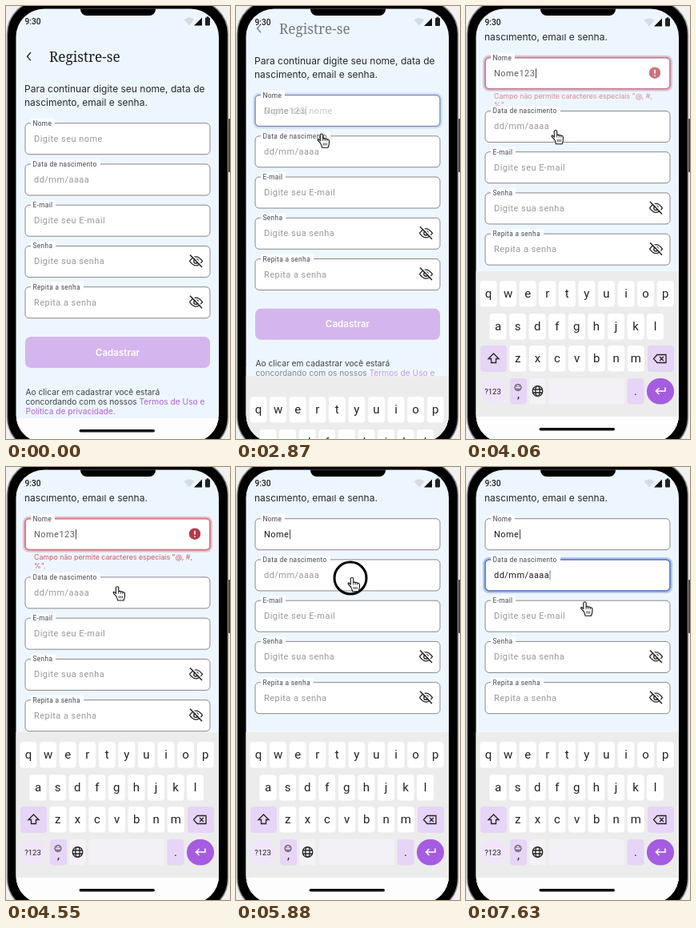
Write an HTML page that moves like this. It is 280 px wide and 542 px high and loops after 8000 ms.

```html
<!DOCTYPE html>
<html lang="pt">
<head>
<meta charset="utf-8">
<title>Registre-se</title>
<style>
  html, body { margin: 0; width: 100%; height: 100%; overflow: hidden; background: #f1f1f1; }
  svg { display: block; width: 280px; height: 542px; font-family: Inter, sans-serif; }
  .para { font-size: 12px; fill: #26282c; }
  .terms { font-size: 10.2px; fill: #3d434a; }
  .link { fill: #b35fdc; }
  .title { font: 500 17.2px "Noto Serif", serif; fill: #1c1c1c; }
  .label { font: 8.3px Roboto, sans-serif; letter-spacing: .35px; fill: #49454f; }
  .value { font: 11px Roboto, sans-serif; letter-spacing: .45px; fill: #1d1b20; }
  .hint { fill: #999; }
  .error { font-size: 8.8px; fill: #cf5968; }
  .key { font: 15px Roboto, sans-serif; fill: #222; text-anchor: middle; }
  .line { fill: none; stroke: #222; stroke-width: 1.3; }
</style>
</head>
<body>
<svg id="stage" viewBox="0 0 280 542"></svg>
<script>
const LOOP = 8000, TICK = 70, SCROLL = 82, GAP = 22;
const stage = document.getElementById('stage');

const clamp = x => Math.max(0, Math.min(1, x));
const smooth = x => x * x * (3 - 2 * x);
const part = (t, from, to) => clamp((t - from) / (to - from));
const easeOut = (t, from) => 1 - (1 - part(t, from, from + 600)) ** 3;

const text = (x, y, cls, str, more = '') => `<text x="${x}" y="${y}" class="${cls}" ${more}>${str}</text>`;
const rect = (x, y, w, h, r, fill, more = '') =>
  `<rect x="${x}" y="${y}" width="${w}" height="${h}" rx="${r}" fill="${fill}" ${more}/>`;
const line = (d, more = '') => `<path class="line" d="${d}" ${more}/>`;
const group = (x, y, body, alpha = 1) => `<g transform="translate(${x} ${y})" opacity="${alpha}">${body}</g>`;

const labels = ['Nome', 'Data de nascimento', 'E-mail', 'Senha', 'Repita a senha'];
const labelWidth = [25, 82, 26, 26, 61];
const hints = ['Digite seu nome', 'dd/mm/aaaa', 'Digite seu E-mail', 'Digite sua senha', 'Repita a senha'];
const errors = [
  ['Campo não permite caracteres especiais "@, #,', '%".'],
  ['O formato da data está incorreto. Por favor, insira', 'no formato DD/MM/AAAA.']
];

const eye = group(237.5, 19,
  line('M-8 0Q0-11 8 0Q0 11-8 0') + '<circle class="line" r="2.7"/>' +
  line('M-6-8.5L8.5 6', 'style="stroke:#fff;stroke-width:1.6"') +
  line('M-7.5-8L7.5 7.5', 'style="stroke-width:1.5"'));

const outline = (color, alpha, width) => alpha > 0 ? `<g opacity="${alpha}">` +
  rect(22.5, -1.5, 234, 42, 6, 'none', `stroke="${color}" stroke-opacity=".4" stroke-width="3"`) +
  rect(24, 0, 231, 39, 5, 'none', `stroke="${color}" stroke-width="${width}"`) + '</g>' : '';

const caret = (x, color, alpha) =>
  `<path d="M${x} 13.5v12" stroke="${color}" stroke-width="1" opacity="${alpha}"/>`;

function field(i, y, { hint = 1, focus = 0, bad = 0, value = '' } = {}) {
  let s = rect(24, 0, 231, 39, 5, '#fff', 'stroke="#8c878a"');
  s += outline('#5a7bd8', focus * (1 - bad), 1.6) + outline('#dc7480', bad, 1.8);
  s += rect(31, -6, labelWidth[i] + 5, 11, 0, '#fafdff') + text(33.5, 3, 'label', labels[i]);
  s += text(35, 23, 'value hint', hints[i], `opacity="${hint}"`) + value;
  if (i > 2) s += eye;
  if (bad > 0) {
    s += `<g opacity="${bad}"><circle cx="236" cy="19" r="7.2" fill="#b33a46"/>` +
      '<path d="M236 15v5m0 1.7v1.6" stroke="#fff" stroke-width="1.5"/>' +
      errors[i].map((e, n) => text(35, 51 + n * 11, 'error', e)).join('') + '</g>';
  }
  return group(0, y, s);
}

function form(t, open) {
  const bad1 = t < 4060 ? 0 : easeOut(t, 3860) - easeOut(t, 5200);
  const bad2 = t < 7630 ? easeOut(t, 6215) : 0;
  const left = 1 - easeOut(t, 5200), date = t >= 7630;
  const name = text(35, 23, 'value',
      `Nome<tspan opacity="${left}">123</tspan>`,
      `opacity="${open}" style="fill:${t < 5200 ? '#5f5f63' : '#1d1b20'}"`) +
    caret(t < 5250 ? 87.5 : 67.5, t < 4000 ? '#5a7bd8' : '#444', open);
  const birth = date
    ? text(35, 23, 'value', 'dd/mm/aaaa') + caret(105, '#5a7bd8', 1)
    : text(35, 23, 'value', '5/8/2025', `opacity="${bad2 * .9}"`) + caret(86.5, '#555', bad2);
  const states = [
    { hint: 1 - open, focus: open * left, bad: bad1, value: name },
    { hint: date ? 0 : 1 - bad2, focus: +date, bad: bad2, value: birth }
  ];
  const shift = i => (i > 0 ? GAP * bad1 : 0) + (i > 1 ? GAP * bad2 : 0);
  let s = text(23, 108, 'para', 'Para continuar digite seu nome, data de') +
    text(23, 125, 'para', 'nascimento, email e senha.');
  labels.forEach((_, i) => s += field(i, 146.7 + i * 51.25 + shift(i), states[i]));
  return s + group(0, shift(4),
    rect(24, 414, 231, 39, 7, '#d5b5ed') +
    text(139.5, 437.5, '', 'Cadastrar', 'font-size="11.6" font-weight="600" fill="#fff" text-anchor="middle"') +
    text(24.5, 486.5, 'terms', 'Ao clicar em cadastrar você estará') +
    text(24.5, 498.5, 'terms', 'concordando com os nossos <tspan class="link">Termos de Uso e</tspan>') +
    text(24.5, 510.5, 'terms link', 'Política de privacidade.'));
}

const lilac = '#e6d5f6';
const letterRow = (str, x, y) => [...str].map((c, i) => {
  const cx = x + i * 24.58;
  return rect(cx - 10.5, y - 16, 21, 32.5, 4, '#fff') + text(cx, y + 5, 'key', c);
}).join('');

const keys =
  letterRow('qwertyuiop', 28, 360) + letterRow('asdfghjkl', 40, 401) + letterRow('zxcvbnm', 64.8, 441) +
  rect(18, 425, 33, 33, 4, lilac) + line('M34.5 435l6.5 6.5h-3.5v5h-6v-5h-3.5z') +
  rect(227, 425, 33, 33, 4, lilac) + line('M234.5 441.5l4.5-5h11v10h-11zM242 439l5 5m0-5l-5 5') +
  rect(18, 466, 31, 32.5, 16, '#f0e5f9') + text(33.5, 485.5, 'key', '?123', 'style="font-size:9.5px"') +
  rect(55, 466, 21, 32.5, 4, lilac) + text(65.5, 491, 'key', ',') +
  '<circle class="line" cx="65" cy="477.5" r="4" style="stroke-width:.9"/>' +
  line('M62.8 478.8q2.2 2.4 4.4 0M63.5 475.5v1.3m3-1.3v1.3', 'style="stroke-width:.9"') +
  rect(79, 466, 21, 32.5, 4, '#f4f2f5') +
  '<circle class="line" cx="89.5" cy="482" r="6.3"/><ellipse class="line" cx="89.5" cy="482" rx="2.7" ry="6.3"/>' +
  line('M83.8 480h11.4m-11.4 4h11.4') +
  rect(103, 466, 95, 32.5, 4, '#f3f1f5') +
  rect(201.5, 466, 21, 32.5, 4, lilac) + text(212, 487, 'key', '.') +
  rect(226, 466, 34, 32.5, 16, '#a55ce0') +
  line('M249 477.5v4.5h-11.5m4-4l-4 4l4 4', 'style="stroke:#fff;stroke-width:1.6"');

const navBar = rect(12, 514, 256, 40, 0, '#fdfdfd') + rect(91.5, 528, 94.5, 3.6, 1.8, '#111');

function keyboard(open) {
  if (!open) return '';
  const rest = 1 - open, top = 332 + 230 * rest;
  return rect(12, top - 12, 256, 12, 0, '#f0f7fd', `opacity="${.65 * rest}"`) +
    rect(12, top, 256, 260, 0, '#ececec') +
    group(0, 254 * rest, keys + navBar);
}

const statusBar = text(23.5, 23.3, '', '9:30', 'style="font:500 10.2px Roboto,sans-serif" fill="#1c1c1c"') +
  '<path d="M222.5 17Q229 11.5 235.5 17L229 24.5z" fill="#d6dce2"/>' +
  '<path d="M235 24.5L245 14.5V24.5z" fill="#111"/>' +
  rect(249, 14.5, 6, 10, 1, '#222') + rect(250.7, 13.3, 2.6, 2, 0, '#222');

// Pointer stops: time, x, y
const stops = [
  [140, 183, 560], [980, 131, 173], [1050, 127, 148], [1260, 127, 148], [1400, 126.5, 154.5],
  [1540, 127, 154.5], [2030, 127, 154.5], [2310, 107, 160], [2870, 107, 160], [3080, 112, 155.5],
  [4060, 112, 155.5], [4690, 143, 149], [4830, 143, 149], [4900, 143.5, 150], [5110, 144, 151],
  [5320, 144, 151], [5740, 145, 138.5], [7000, 145, 138.5], [7210, 148.5, 169]
];
const arrow = '<path d="M0 0V13.5L3.2 10.6L5.5 16L8 15L5.7 9.8H9.8Z" fill="#000" stroke="#fff" stroke-width=".8"/>';
const hand = '<path d="M-1.5 11.5L-4.5 8.5Q-5.5 6.8-4 6.5L-1.7 8.3V1.5Q-1.7 0 0 0T1.7 1.5V6Q3.3 5 4.3 6.3Q5.9 5.5 6.8 7Q9 6.5 9.4 8.5V12Q9.2 14.5 8 17.2H.6Q-.3 13.5-1.5 11.5Z" fill="#fff" stroke="#111" stroke-width="1.1"/>' +
  '<path d="M1.7 6v3m2.6-2.5V9m2.5-2v2.3M2.3 11.5v3m2-3v3m2-3v3" stroke="#111" stroke-width=".8"/>';

function pointer(t) {
  if (t < 210) return '';
  const n = stops.findIndex(s => s[0] > t);
  const b = stops[n < 0 ? stops.length - 1 : n], a = n < 0 ? b : stops[n - 1];
  const k = a === b ? 1 : smooth(part(t, a[0], b[0]));
  return group(a[1] + (b[1] - a[1]) * k, a[2] + (b[2] - a[2]) * k, t < 2170 ? arrow : hand);
}

function ring(t, start, end, x, y, grow) {
  if (t < start || t >= end) return '';
  const k = part(t, start, end);
  return `<circle cx="${x}" cy="${y}" r="${20 + grow * k}" fill="none" stroke="#000" stroke-width="3" opacity="${clamp(1.4 * (1 - k))}"/>`;
}

const frame =
  rect(1.5, -7, 276, 564, 42, '#000', 'stroke="#8b8b8d" stroke-width="1.5"') +
  rect(278, 141, 3, 67, 1, '#444');
const notch = rect(93, -10, 94, 22, 8, '#000');

function draw(t) {
  const open = smooth(part(t, 2680, 3100));
  stage.innerHTML = '<defs><clipPath id="screen">' + rect(12.5, 3.5, 253.5, 543, 35, '#000') +
    '</clipPath><clipPath id="page">' + rect(12, 35, 256, 520, 0, '#000') + '</clipPath></defs>' +
    frame + '<g clip-path="url(#screen)">' + rect(12, 0, 256, 550, 0, '#edf6fe') +
    group(0, -SCROLL * open,
      line('M31 58l-4.5 5.2l4.5 5.2') + text(54, 70, 'title', 'Registre-se'), 1 - open) +
    `<g clip-path="url(#page)">${group(0, -SCROLL * open, form(t, open))}</g>` +
    group(0, open, statusBar) + group(0, 2, navBar) + keyboard(open) + notch + '</g>' +
    ring(t, 1680, 1960, 127, 155, 1) + ring(t, 2520, 2730, 107, 160.5, 12) +
    ring(t, 5880, 6090, 143, 139, 12) + pointer(t);
}

let last = -1;
function play(now) {
  const tick = Math.floor(now % LOOP / TICK);
  if (tick !== last) draw((last = tick) * TICK);
  requestAnimationFrame(play);
}
draw(0);
requestAnimationFrame(play);
</script>
</body>
</html>
```
